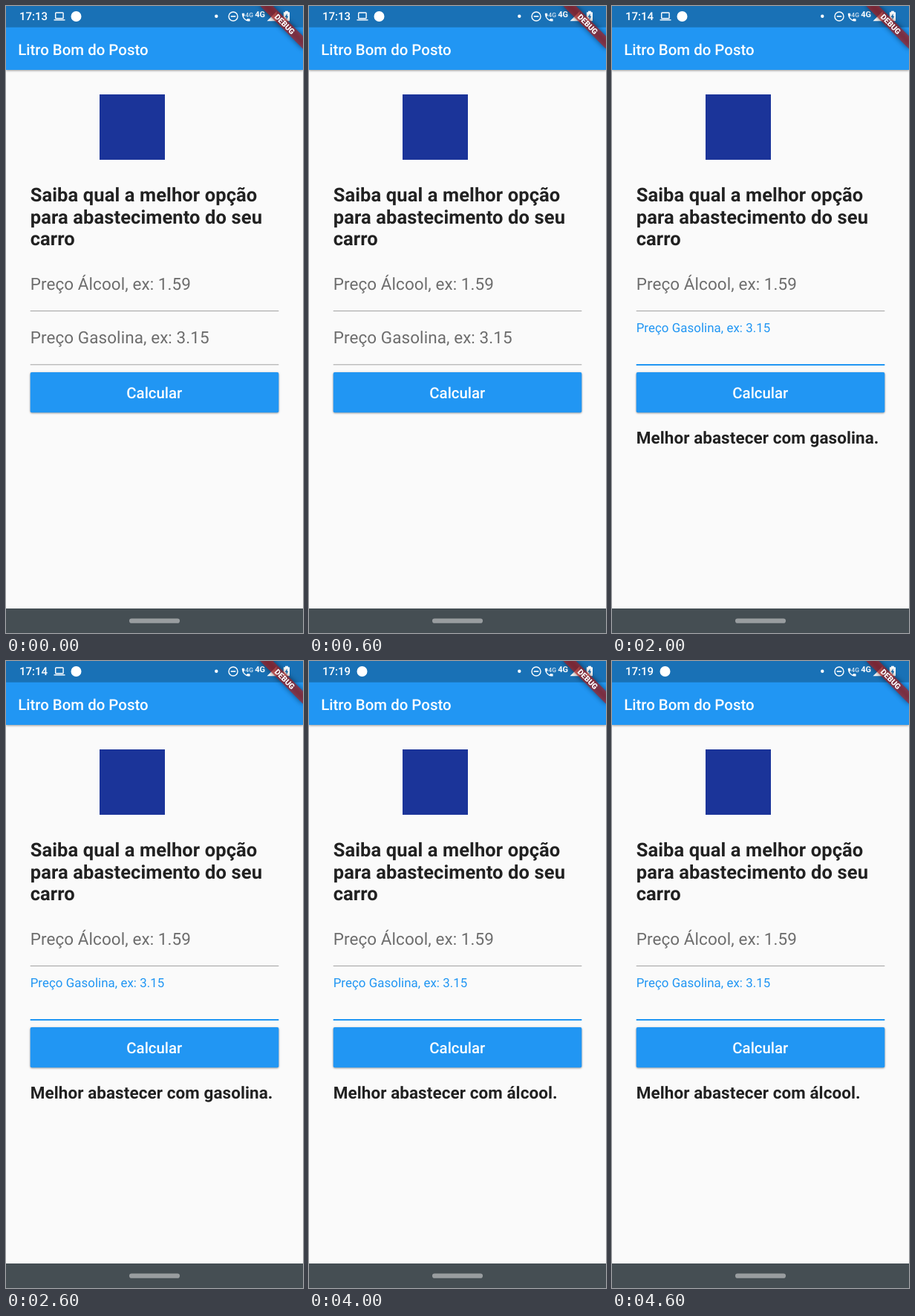
Write an HTML page that moves like this. It is 400 px wide and 844 px high and loops after 5000 ms.

```html
<!DOCTYPE html>
<html lang="pt-BR">
<head>
<meta charset="utf-8">
<title>Litro Bom do Posto</title>
<style>
  html, body { margin: 0; width: 100%; height: 100%; overflow: hidden; background: #fafafa; }
  svg { display: block; width: 400px; height: 844px; font-family: Roboto, sans-serif; text-rendering: geometricPrecision; }
  .scene { opacity: 0; animation: slot 5s step-end infinite; animation-delay: calc(var(--n) * 1s - 5s); }
  @keyframes slot { 0% { opacity: 1; } 20%, 100% { opacity: 0; } }

  .clock { font-size: 15px; font-weight: 500; fill: #fff; }
  .title, .action { font-size: 20.4px; font-weight: 500; fill: #fff; }
  .heading { font-size: 25.5px; font-weight: 700; fill: #212121; }
  .result { font-size: 22.46px; font-weight: 700; fill: #212121; }
  .hint { font-size: 22.46px; fill: #6d6d6d; }
  .label { font-size: 16.84px; fill: #6d6d6d; }
  .heading, .result, .hint, .label { letter-spacing: .004em; }
  .value { font-size: 22.46px; fill: #212121; }
  .focus { fill: #2196f3; }
  .rule { fill: #a2a2a2; }
  .bar { filter: drop-shadow(0 1px 1.5px rgba(0, 0, 0, .4)); }
  .button { filter: drop-shadow(0 1px 1px rgba(0, 0, 0, .3)) drop-shadow(0 0 1.5px rgba(0, 0, 0, .12)); }
  .shade { filter: blur(3.5px); opacity: .5; }
  .debug { font-size: 10.2px; font-weight: 900; fill: #fff; text-anchor: middle; }
</style>
</head>
<body>
<svg viewBox="0 0 400 844">
  <defs>
    <g id="laptop" fill="none" stroke="#fff" stroke-width="1.4">
      <rect x="66.7" y="9" width="10.4" height="7.8" rx=".8"/>
      <path d="M64.5 18.8H79.5"/>
    </g>
    <circle id="badge" cy="14" r="7" fill="#fff"/>

    <text id="hint1" class="hint" x="32.7" y="382">Preço Álcool, ex: 1.59</text>
    <text id="hint2" class="hint" x="32.7" y="454">Preço Gasolina, ex: 3.15</text>
    <text id="label1" class="label" x="32.7" y="366.5">Preço Álcool, ex: 1.59</text>
    <g id="focused" class="focus">
      <text class="label focus" x="32.7" y="438.5">Preço Gasolina, ex: 3.15</text>
      <rect x="32.7" y="482" width="334.6" height="2"/>
    </g>
  </defs>

  <rect width="400" height="844" fill="#fafafa"/>

  <!-- App bar and status bar -->
  <rect class="bar" width="400" height="86" fill="#2196f3"/>
  <rect width="400" height="28.7" fill="#1971b6"/>
  <text class="title" x="16.3" y="65.7">Litro Bom do Posto</text>

  <g fill="#fff">
    <circle cx="283.3" cy="13.8" r="2.2"/>
    <circle cx="306" cy="14" r="6" fill="none" stroke="#fff" stroke-width="1.4"/>
    <rect x="302.7" y="13.2" width="6.6" height="1.6"/>
    <path transform="translate(316 8) scale(.6)" d="M6.6 10.8c1.4 2.8 3.8 5.1 6.6 6.6l2.2-2.2c.3-.3.7-.4 1-.2 1.1.4 2.3.6 3.6.6.5 0 1 .4 1 1V20c0 .5-.5 1-1 1C10.6 21 3 13.4 3 4c0-.5.4-1 1-1h3.5c.6 0 1 .5 1 1 0 1.2.2 2.4.6 3.6.1.3 0 .7-.3 1z"/>
    <text x="322.3" y="14.5" font-size="8.5" font-weight="500" opacity=".8">4G</text>
    <text x="335.3" y="15.3" font-size="11" font-weight="700">4G</text>
    <path d="M351.5 20.3L364.5 7.3V20.3z"/>
    <path d="M376 8.2V6.8H379.8V8.2H381.2Q382 8.2 382 9V19.5Q382 20.3 381.2 20.3H374.6Q373.8 20.3 373.8 19.5V9Q373.8 8.2 374.6 8.2z"/>
    <path d="M378.6 10L375.7 14.9H377.5V18.6L380.3 13.7H378.6z" fill="#1971b6"/>
  </g>

  <g transform="translate(400 0) rotate(45) scale(1.0204)">
    <rect class="shade" x="-40" y="28" width="80" height="12"/>
    <rect x="-40" y="28" width="80" height="12" fill="#b71c1c" fill-opacity=".627"/>
    <text class="debug" y="37.6">DEBUG</text>
  </g>

  <!-- Form -->
  <rect x="126" y="119" width="88" height="88" fill="#1b3499"/>
  <g class="heading">
    <text x="32.7" y="262.6">Saiba qual a melhor opção</text>
    <text x="32.7" y="292.5">para abastecimento do seu</text>
    <text x="32.7" y="322.4">carro</text>
  </g>
  <rect class="rule" x="32.7" y="410" width="334.6" height="1"/>
  <rect class="button" x="32.7" y="493" width="334.6" height="54.3" rx="2" fill="#2196f3"/>
  <text class="action" x="199.8" y="528.2" text-anchor="middle">Calcular</text>

  <!-- Navigation bar -->
  <rect y="811" width="400" height="33" fill="#454e53"/>
  <rect x="166" y="824.5" width="68" height="6.3" rx="3.1" fill="#999da0"/>

  <!-- One group per second -->
  <g class="scene" style="--n:0">
    <text class="clock" x="18" y="19.3">17:13</text>
    <use href="#laptop"/><use href="#badge" x="94.5"/>
    <use href="#hint1"/><use href="#hint2"/>
    <rect class="rule" x="32.7" y="482.3" width="334.6" height="1"/>
  </g>
  <g class="scene" style="--n:1">
    <text class="clock" x="18" y="19.3">17:14</text>
    <use href="#laptop"/><use href="#badge" x="94.5"/>
    <use href="#label1"/><use href="#focused"/>
    <text class="value" x="32.7" y="392.8">2.50</text>
    <text class="value" x="32.7" y="464.8">3.00</text>
    <rect class="focus" x="76.7" y="444" width="2" height="26.5"/>
  </g>
  <g class="scene" style="--n:2">
    <text class="clock" x="18" y="19.3">17:14</text>
    <use href="#laptop"/><use href="#badge" x="94.5"/>
    <use href="#hint1"/><use href="#focused"/>
    <text class="result" x="32.7" y="588.5">Melhor abastecer com gasolina.</text>
  </g>
  <g class="scene" style="--n:3">
    <text class="clock" x="18" y="19.3">17:18</text>
    <use href="#badge" x="71.5"/>
    <use href="#label1"/><use href="#focused"/>
    <text class="value" x="32.7" y="392.8">1.00</text>
    <text class="value" x="32.7" y="464.8">6.00</text>
  </g>
  <g class="scene" style="--n:4">
    <text class="clock" x="18" y="19.3">17:19</text>
    <use href="#badge" x="71.5"/>
    <use href="#hint1"/><use href="#focused"/>
    <text class="result" x="32.7" y="588.5">Melhor abastecer com álcool.</text>
  </g>
</svg>
</body>
</html>
```
